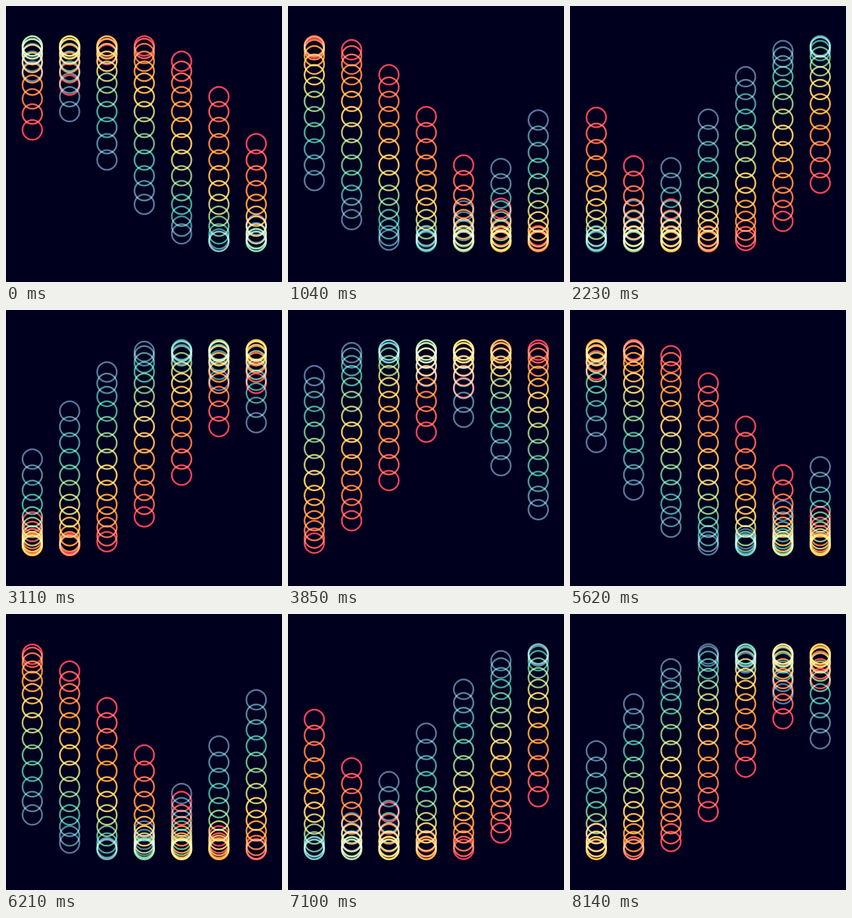
These frames come from a looping animation (493x492 px, 8160 ms). An HTML page with a canvas:

```html
<!DOCTYPE html>
<html lang="en">
<head>
<meta charset="utf-8">
<title>Ring waves</title>
<style>
  html, body { margin: 0; width: 100%; height: 100%; overflow: hidden; background: #00001e; }
  canvas { display: block; }
</style>
</head>
<body>
<canvas width="493" height="492"></canvas>
<script>
const LOOP = 8160, STEP = 147.8;
const COLUMNS = 7, RINGS = 14;
const MID = 245.5, SWING = 174.7, RADIUS = 17.5;
const PALETTE = ["f94144", "f3722c", "f8961e", "f9c74f", "90be6d", "43aa8b", "577590"]
  .map(hex => hex.match(/../g).map(pair => parseInt(pair, 16)));

// Two rings per palette colour, three for the last blend
function ringColor(i) {
  const pos = Math.min(i / 2, 5 + (i - 10) / 3);
  const n = Math.min(Math.floor(pos), PALETTE.length - 2);
  const mix = PALETTE[n].map((c, k) => Math.round(c + (PALETTE[n + 1][k] - c) * (pos - n)));
  return `rgb(${mix})`;
}
const colors = Array.from({ length: RINGS }, (_, i) => ringColor(i));

const ctx = document.querySelector("canvas").getContext("2d");
ctx.lineWidth = 3;

function draw(step) {
  // The first step is a little shorter than the others
  const turn = Math.max(0, step * 0.06 * Math.PI - 0.1);
  ctx.globalCompositeOperation = "source-over";
  ctx.fillStyle = "#00001e";
  ctx.fillRect(0, 0, 493, 492);
  ctx.globalCompositeOperation = "screen";
  for (let col = 0; col < COLUMNS; col++) {
    const x = 47 + col * 200 / 3;
    for (let i = 0; i < RINGS; i++) {
      const y = MID + SWING * Math.sin(turn + (col - 6) / 2 + i / 6);
      ctx.strokeStyle = colors[i];
      ctx.beginPath();
      ctx.arc(x, y, RADIUS, 0, 2 * Math.PI);
      ctx.stroke();
    }
  }
}

const origin = performance.now();
function tick() {
  const t = (performance.now() - origin) % LOOP;
  draw(Math.floor(t / STEP));
  requestAnimationFrame(tick);
}
tick();
</script>
</body>
</html>
```
